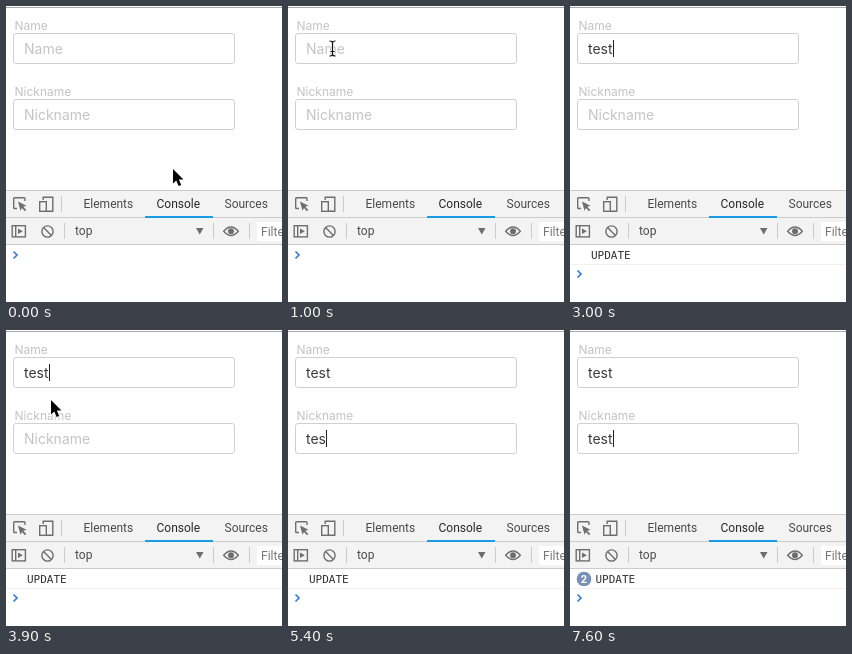
Write an HTML page that moves like this. It is 276 px wide and 296 px high and loops after 8000 ms.

```html
<!DOCTYPE html>
<html lang="en">
<head>
<meta charset="utf-8">
<title>Debounced form updates</title>
<style>
  html, body { margin: 0; width: 100%; height: 100%; overflow: hidden; background: #fff; }
  svg { display: block; width: 276px; height: 296px; }
  .form { font-family: Inter, "Open Sans", sans-serif; }
  .label { font-size: 12px; fill: #c3c3c3; }
  .value { font-size: 14px; fill: #3c3c3c; }
  .value.empty { fill: #c4c4c4; }
  .tools { font: 12px Roboto, "Liberation Sans", sans-serif; fill: #4a4a4a; }
  .log { font: 11px "DejaVu Sans Mono", monospace; fill: #303030; }
  .icon { fill: none; stroke: #6e6e6e; stroke-width: 1.4; }
  .rule { stroke: #ccc; shape-rendering: crispEdges; }
</style>
</head>
<body>
<svg viewBox="0 0 276 296" xmlns="http://www.w3.org/2000/svg">
  <rect width="276" height="296" fill="#fff"/>
  <path d="M0 1.5H276" stroke="#a8a8a8"/>

  <g class="form" id="form"></g>

  <g class="tools">
    <rect y="184" width="276" height="55" fill="#f3f3f3"/>
    <path class="rule" d="M0 184.500H276M0 211.500H276M0 238.500H276M55.500 190V206M58.500 217V233M207.500 217V233M243.500 217V233"/>
    <rect x="139" y="210" width="68" height="2" fill="#1a9be8"/>

    <g class="icon">
      <path d="M11 202.500H8.500Q7.700 202.500 7.700 201.700V192.500Q7.700 191.700 8.500 191.700H18.200Q19 191.700 19 192.500V195"/>
      <path d="M12 195.500L20.500 199.700L17.300 200.800L20.300 204L19 205.200L16 202L14.500 204.700Z" fill="#6e6e6e" stroke="none"/>
      <path d="M37.200 194V191.200H46.800V205.300H41"/>
      <rect x="33.700" y="195.700" width="6.600" height="9.600"/>
      <rect x="6.200" y="219.700" width="13.200" height="11.200"/>
      <path d="M9.700 219.700V231"/>
      <path d="M12 222.500L16.800 225.300L12 228.100Z" fill="#6e6e6e" stroke="none"/>
      <circle cx="41.500" cy="225.500" r="5.600"/>
      <path d="M37.600 221.600L45.400 229.400"/>
      <path d="M217.700 225.300Q225 216.800 232.300 225.300Q225 233.800 217.700 225.300Z"/>
      <circle cx="225" cy="225.300" r="3" fill="#6e6e6e" stroke="none"/>
    </g>

    <text x="77.500" y="202">Elements</text>
    <text x="150.500" y="202" fill="#282828">Console</text>
    <text x="218.500" y="202">Sources</text>
    <text x="69" y="229">top</text>
    <path d="M190 222H197.500L193.750 228.500Z" fill="#6e6e6e"/>
    <rect x="251" y="216" width="25" height="19" fill="#fff"/>
    <text x="255" y="230" fill="#777">Filter</text>
  </g>

  <g id="entry">
    <path d="M0 258.500H276" stroke="#f0f0f0"/>
    <g id="badge">
      <circle cx="14" cy="249" r="7.300" fill="#7890b8"/>
      <text x="14" y="253" text-anchor="middle" font-family="Roboto, sans-serif" font-size="11" font-weight="700" fill="#fff">2</text>
    </g>
    <text class="log" id="message" y="253">UPDATE</text>
  </g>
  <path id="prompt" d="M7.500 -3.500L11 0L7.500 3.500" fill="none" stroke="#367cd8" stroke-width="1.700"/>

  <path id="arrow" d="M0 0V14.500L3.300 11.500L5.600 17L8.200 15.900L5.900 10.500H10.500Z"
        fill="#000" stroke="#fff" stroke-width="1.300" paint-order="stroke" stroke-linejoin="round"/>
  <g id="beam" fill="none">
    <path d="M-3 -7.500Q0 -7.500 0 -5.500Q0 -7.500 3 -7.500M-3 7.500Q0 7.500 0 5.500Q0 7.500 3 7.500M0 -6V6M-2 3H2" stroke="#fff" stroke-width="2.600"/>
    <path d="M-3 -7.500Q0 -7.500 0 -5.500Q0 -7.500 3 -7.500M-3 7.500Q0 7.500 0 5.500Q0 7.500 3 7.500M0 -6V6M-2 3H2" stroke="#111" stroke-width="1.200"/>
  </g>
</svg>

<script>
const LOOP = 8000, TICK = 100;
const WORD = "test";
const CARET_X = [18, 23, 31, 38, 43];

const $ = id => document.getElementById(id);
const show = (node, on) => node.setAttribute("visibility", on ? "visible" : "hidden");
const place = (node, x, y) => node.setAttribute("transform", `translate(${x} ${y})`);
const within = (t, spans) => spans.some(([from, to]) => t >= from && t < to);

const fields = [
  { name: "Name", top: 27, keys: [2100, 2300, 2500, 2600],
    caret: [[1300, 1800], [2100, 3100], [3600, 4100]] },
  { name: "Nickname", top: 93, keys: [5200, 5300, 5400, 5600],
    caret: [[4300, 4800], [5200, 6100], [6600, 7100], [7600, LOOP]] }
];

// time, x, y of the pointer's hot spot
const pointerPath = [
  [300, 167, 163], [1000, 44, 42],
  [3800, 44, 42], [3900, 45, 70], [4000, 48, 96], [4100, 50, 104],
  [6500, 50, 104], [6600, 97, 82]
];
const pointerShown = [[0, 2100], [3800, 5200], [6600, 6700]];

function addField(field) {
  const { name, top } = field;
  const group = document.createElementNS("http://www.w3.org/2000/svg", "g");
  group.innerHTML = `
    <text class="label" x="8.500" y="${top - 3}">${name}</text>
    <rect x="7.500" y="${top + .5}" width="221" height="30" rx="2.500" fill="#fff" stroke="#d0d0d0"/>
    <text class="value" x="18" y="${top + 21}"></text>
    <rect y="${top + 7}" width="1" height="17" fill="#222"/>`;
  $("form").append(group);
  field.text = group.querySelector(".value");
  field.bar = group.lastElementChild;
}

function drawField({ name, keys, caret, text, bar }, t) {
  const count = keys.filter(key => t >= key).length;
  text.textContent = count ? WORD.slice(0, count) : name;
  text.classList.toggle("empty", !count);
  bar.setAttribute("x", CARET_X[count]);
  show(bar, within(t, caret));
}

function pointerAt(t) {
  const next = pointerPath.findIndex(([time]) => time > t);
  if (next === 0) return pointerPath[0].slice(1);
  if (next < 0) return pointerPath.at(-1).slice(1);
  const [t0, x0, y0] = pointerPath[next - 1];
  const [t1, x1, y1] = pointerPath[next];
  const u = (t - t0) / (t1 - t0);
  const ease = u * u * (3 - 2 * u);
  return [x0 + (x1 - x0) * ease, y0 + (y1 - y0) * ease];
}

function drawPointer(t) {
  const [x, y] = pointerAt(t);
  const visible = within(t, pointerShown);
  const overField = fields.some(({ top }) => y >= top && y <= top + 31);
  place($("arrow"), x, y);
  place($("beam"), x + .5, y + .5);
  show($("arrow"), visible && !overField);
  show($("beam"), visible && overField);
}

function drawConsole(t) {
  const logged = t >= 3000, repeated = t >= 5900;
  $("entry").setAttribute("display", logged ? "inline" : "none");
  $("badge").setAttribute("display", repeated ? "inline" : "none");
  $("message").setAttribute("x", repeated ? 25.5 : 21);
  place($("prompt"), 0, logged ? 268 : 249);
}

function render(time) {
  const t = Math.floor((time % LOOP) / TICK) * TICK;
  fields.forEach(field => drawField(field, t));
  drawConsole(t);
  drawPointer(t);
}

fields.forEach(addField);
const start = performance.now();
function frame() {
  render(performance.now() - start);
  requestAnimationFrame(frame);
}
frame();
</script>
</body>
</html>
```
